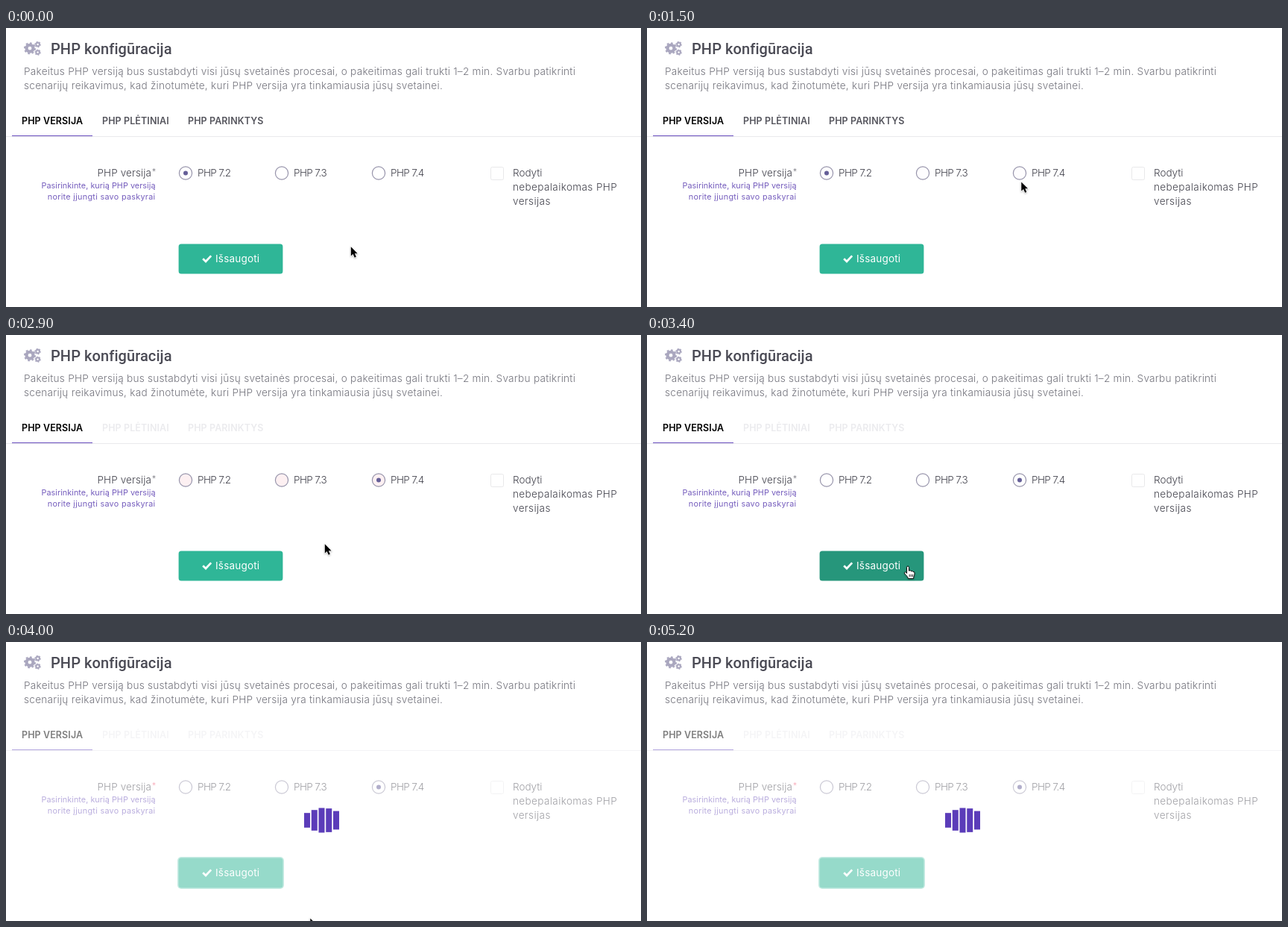
An HTML page for the animation above (5300 ms loop, 852 px wide and 374 px high).

```html
<!DOCTYPE html>
<html lang="lt">
<head>
<meta charset="utf-8">
<title>PHP konfigūracija</title>
<style>
  html, body { margin: 0; width: 100%; height: 100%; overflow: hidden; background: #fff; }
  svg { display: block; }
  text { font: 300 13.5px Inter, sans-serif; fill: #42424c; }
  .title { font: 500 20px Roboto, sans-serif; fill: #4a4a54; letter-spacing: .07px; }
  .intro { font-size: 13.6px; fill: #74747d; letter-spacing: .26px; }
  .tab { font-weight: 600; font-size: 12.5px; fill: #000; letter-spacing: .1px; }
  .option { letter-spacing: -.6px; }
  .name { letter-spacing: .1px; }
  .wide { letter-spacing: .4px; }
  .hint { font-size: 10.8px; font-weight: 400; fill: #755dbd; letter-spacing: .05px; }
  .save { font-weight: 400; fill: #fff; letter-spacing: .2px; }
  .end { text-anchor: end; }
  .gear { fill: none; stroke: #aaa7bf; }
  .ring { stroke: #9794ab; stroke-width: 1.2; }
</style>
</head>
<body>
<svg width="852" height="374" viewBox="0 0 852 374">
  <g id="gears"></g>
  <text class="title" x="60" y="35">PHP konfigūracija</text>
  <text class="intro" x="24" y="63">Pakeitus PHP versiją bus sustabdyti visi jūsų svetainės procesai, o pakeitimas gali trukti 1–2 min. Svarbu patikrinti</text>
  <text class="intro" x="24" y="82">scenarijų reikavimus, kad žinotumėte, kuri PHP versija yra tinkamiausia jūsų svetainei.</text>

  <g id="form">
    <text class="tab" x="21" y="129">PHP VERSIJA</text>
    <g id="otherTabs">
      <text class="tab" x="129" y="129" style="fill:inherit">PHP PLĖTINIAI</text>
      <text class="tab" x="244" y="129" style="fill:inherit">PHP PARINKTYS</text>
    </g>
    <path d="M0 145.5H852" stroke="#e9e9ec"/>
    <path d="M8 144.5H116" stroke="#6a4fc0"/>

    <text class="name end" x="195" y="199">PHP versija</text>
    <text id="star" x="195.8" y="197" style="font-size:11px;fill:inherit">*</text>
    <text class="hint end" x="200.5" y="215">Pasirinkinte, kurią PHP versiją</text>
    <text class="hint end" x="200.5" y="230" style="letter-spacing:.3px">norite įjungti savo paskyrai</text>

    <g id="radios"></g>
    <circle id="dot" cy="194.5" r="3" fill="#655f98"/>
    <rect x="650.5" y="186.5" width="17" height="17" rx="2" fill="#fff" stroke="#e8e8ea"/>
    <text x="680" y="199">Rodyti</text>
    <text class="wide" x="680" y="218">nebepalaikomas PHP</text>
    <text class="wide" x="680" y="237">versijas</text>

    <rect id="glow" x="230" y="288" width="143" height="43" rx="5" fill="#8fd9c8"/>
    <rect id="button" x="231.6" y="289.5" width="139.8" height="40" rx="3.5"/>
    <path d="M264.2 309.2L268 313L275.2 305.4" fill="none" stroke="#fff" stroke-width="2.7"/>
    <text class="save" x="281" y="314">Išsaugoti</text>
  </g>

  <g id="loader" fill="#5b3cb9"></g>

  <g id="cursor" style="filter:drop-shadow(0 1px 1px #0004)">
    <path id="arrow" transform="translate(.8 .3) scale(.88)" d="M0 0V13.8L3.2 10.9L5.6 16.4L8 15.4L5.7 10.1H10Z" stroke="#fff" paint-order="stroke" stroke-width="1.4"/>
    <g id="hand" transform="translate(0 -.6) scale(.95)" stroke="#000" stroke-linejoin="round">
      <path fill="#fff" d="M-1.5 9.5V1a1.5 1.5 0 0 1 3 0V6q2.8-1.4 3 .6q2.5-1 2.8.8q2.2-.6 2.2 1.6c0 4-1.5 4.5-1.5 8H.5C0 14-2.5 12.5-4.5 10q-1-2 .8-2.2q1 .2 2.2 1.7Z"/>
      <path d="M2.3 11v3.5M4.6 11v3.5M6.8 11v3.5" stroke-width=".9"/>
    </g>
  </g>
</svg>
<script>
const LOOP = 5300;
const SELECT = 1850, SUBMIT = 3550;
const OPTIONS = [[241, "PHP 7.2"], [370, "PHP 7.3"], [500, "PHP 7.4"]];
const el = id => document.getElementById(id);
const clamp = v => Math.min(1, Math.max(0, v));
const smooth = v => v * v * (3 - 2 * v);
const progress = (t, from, to) => smooth(clamp((t - from) / (to - from)));
const mix = (a, b, p) => `color-mix(in srgb, ${b} ${p * 100}%, ${a})`;

// Pointer tip: time, x, y
const route = [
  [0, 462, 293], [300, 465, 295], [450, 465, 295], [950, 496, 252], [1050, 496, 250],
  [1600, 502, 202], [2300, 502, 202], [2900, 427, 280], [3000, 427, 280],
  [3300, 350, 311], [3550, 350, 311], [4150, 418, 381]
];

function pointerAt(t) {
  const next = route.findIndex(point => point[0] > t);
  if (next < 0) return route.at(-1).slice(1);
  const [t0, x0, y0] = route[next - 1], [t1, x1, y1] = route[next];
  const p = progress(t, t0, t1);
  return [x0 + (x1 - x0) * p, y0 + (y1 - y0) * p];
}

const gear = (x, y, r, teeth) => `<g class="gear" transform="translate(${x} ${y})">
  <circle r="${r * .56}" stroke-width="${r * .52}"/>
  <circle r="${r * .88}" stroke-width="${r * .25}" pathLength="${teeth * 2}" stroke-dasharray="1"/></g>`;
el("gears").innerHTML = gear(32, 27.2, 8, 8) + gear(42.6, 22, 4.2, 6) + gear(42.6, 32.6, 4.2, 6);

el("radios").innerHTML = OPTIONS.map(([x, label]) =>
  `<circle class="ring" cx="${x}" cy="194.5" r="8.6"/>
   <text class="option" x="${x + 16}" y="199">${label}</text>`).join("");

el("loader").innerHTML = [0, 1, 2, 3, 4].map(i =>
  `<rect x="${400 + i * 9.75}" width="8"/>`).join("");
const bars = [...el("loader").children];

function drawBars(t) {
  const period = 1200, rise = 240, lag = 65, firstPeak = 5050;
  bars.forEach((bar, i) => {
    const phase = ((t - firstPeak - i * lag) % period + period * 1.5) % period - period / 2;
    const height = 33.5 * (.4 + .6 * smooth(clamp(1 - Math.abs(phase) / rise)));
    bar.setAttribute("y", 239 - height / 2);
    bar.setAttribute("height", height);
  });
}

function radioFill(t) {
  if (t < 2400) return mix("#fff", "#dcd5f2", progress(t, 1480, 1650));
  if (t < 3050) return mix("#dcd5f2", "#fdf0f2", progress(t, 2400, 2650));
  return "#fff";
}

function draw(t) {
  const loading = t >= SUBMIT;
  el("form").setAttribute("opacity", loading ? .5 : 1);
  el("otherTabs").style.fill = mix("#55555d", "#ebebee", progress(t, 1800, 2080));
  el("star").style.fill = loading ? "#f0506e" : "#77777f";

  el("radios").style.fill = radioFill(t);
  el("dot").setAttribute("cx", OPTIONS[t < SELECT ? 0 : 2][0]);

  const hover = progress(t, 3150, 3350) - progress(t, SUBMIT, 3850);
  el("button").style.fill = mix("#2fb697", "#26967b", hover);
  el("glow").setAttribute("opacity", progress(t, SUBMIT, 3700));

  el("loader").style.display = loading ? "" : "none";
  drawBars(t);

  const [x, y] = pointerAt(t);
  const pointing = t >= 1650 && t < 2350 || t >= 3150 && t < 3650;
  el("cursor").setAttribute("transform", `translate(${x} ${y})`);
  el("arrow").style.display = pointing ? "none" : "";
  el("hand").style.display = pointing ? "" : "none";
}

const start = performance.now();
function frame() {
  draw((performance.now() - start) % LOOP);
  requestAnimationFrame(frame);
}
frame();
</script>
</body>
</html>
```
